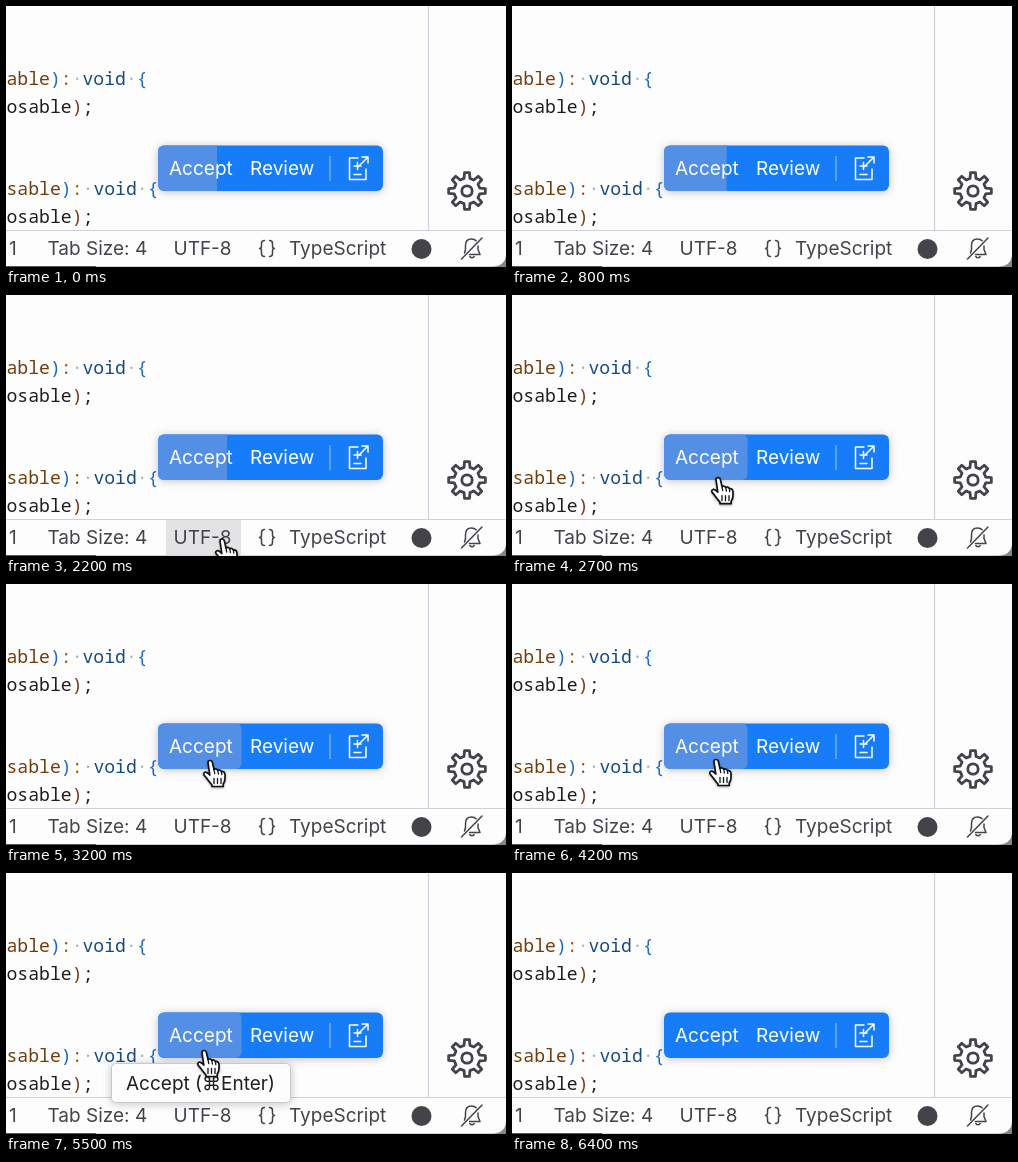
An HTML page that plays this animation: 500 by 261 pixels, repeating every 6500 ms.

```html
<!DOCTYPE html>
<html lang="en">
<head>
<meta charset="utf-8">
<title>Inline edit progress</title>
<style>
  html, body { margin: 0; width: 100%; height: 100%; overflow: hidden; background: #d2d2d6; }
  svg { display: block; width: 100%; height: 100%; }
  text { font: 19px Inter, "Open Sans", sans-serif; fill: #434349; }
  .code text { font: 500 18.1px "Noto Sans Mono", "DejaVu Sans Mono", monospace; fill: #1d1d1f; white-space: pre; }
  .code .param { fill: #713d0b; }
  .code .bracket { fill: #1d68c4; }
  .code .colon { fill: #9a4a10; }
  .code .type { fill: #174a80; }
  .code .dot { fill: #a3aeb4; }
  .code .inner { fill: #7b3814; }
  .icon { fill: none; stroke: #434349; stroke-width: 1.5; stroke-linejoin: round; stroke-linecap: round; }
  .gear { stroke-width: 2.8; }
  .white text { fill: #fff; }
  .white .icon { stroke: #fff; }
  .shadow { filter: drop-shadow(0 1px 4px rgba(40, 40, 60, .28)); }
  .rule { stroke: #d0d0da; stroke-width: 1.2; }
  #tooltip text { fill: #1f1f22; }
</style>
</head>
<body>
<svg viewBox="0 0 500 261" preserveAspectRatio="none">
  <defs>
    <clipPath id="buttonShape"><rect x="152" y="139.5" width="225" height="45.5" rx="6"/></clipPath>
  </defs>

  <path d="M485 261Q500 261 500 246V261Z" fill="#85858d"/>
  <path d="M0 0H500V247Q500 260 487 260H0Z" fill="#fdfdfd"/>
  <path d="M0 260.5H90" stroke="#55555c"/>
  <path class="rule" d="M422.5 0V224M0 224.5H500"/>

  <g class="code">
    <text x="0.5" y="79"><tspan class="param">able</tspan><tspan class="bracket">)</tspan><tspan class="colon">:</tspan><tspan class="dot">·</tspan><tspan class="type">void</tspan><tspan class="dot">·</tspan><tspan class="bracket">{</tspan></text>
    <text x="0.5" y="107">osable<tspan class="inner">)</tspan>;</text>
    <text x="0.5" y="189"><tspan class="param">sable</tspan><tspan class="bracket">)</tspan><tspan class="colon">:</tspan><tspan class="dot">·</tspan><tspan class="type">void</tspan><tspan class="dot">·</tspan><tspan class="bracket">{</tspan></text>
    <text x="0.5" y="217">osable<tspan class="inner">)</tspan>;</text>
  </g>

  <g class="icon gear" transform="translate(461 185)">
    <path id="gear"/>
    <circle r="5.2"/>
  </g>

  <rect id="encodingHover" x="160" y="225" width="75" height="35" fill="#e3e3e5"/>
  <g>
    <text x="3" y="249">1</text>
    <text x="41.5" y="249">Tab Size: 4</text>
    <text x="167.5" y="249">UTF-8</text>
    <text x="283" y="249">TypeScript</text>
  </g>
  <path class="icon" d="M258.5 234.5Q255.5 234.5 255.5 237.5V240Q255.5 242.5 253.5 242.5Q255.5 242.5 255.5 245V247.5Q255.5 250.5 258.5 250.5M263.5 234.5Q266.5 234.5 266.5 237.5V240Q266.5 242.5 268.5 242.5Q266.5 242.5 266.5 245V247.5Q266.5 250.5 263.5 250.5"/>
  <circle cx="415.5" cy="243" r="10" fill="#434349"/>
  <path class="icon" d="M455.5 253L476 232M458.5 247L459.5 243.5V239.5Q459.5 233 465.5 233Q468.5 233 470.2 234.8M472 240V243.5L474 248.5H463.5M463.8 250.5Q466 253 468.2 250.5"/>

  <g class="white">
    <rect class="shadow" x="152" y="139.5" width="225" height="45.5" rx="6" fill="#167cf8"/>
    <g clip-path="url(#buttonShape)">
      <rect id="fill" x="152" y="139" height="46" fill="#548fe6"/>
    </g>
    <text x="163" y="169">Accept</text>
    <text x="244" y="169">Review</text>
    <path d="M324 150V175" stroke="#fff" stroke-opacity=".45" stroke-width="1.3"/>
    <path class="icon" d="M352 152H343.5V173.5H360V163M348 160H355M351.5 156.5V163.5M348 168.5H355M352.5 160.5L362 151M356 151H362V157"/>
  </g>

  <g id="tooltip">
    <rect class="shadow" x="105.5" y="190.5" width="179" height="39" rx="4" fill="#fdfdfd" stroke="#c9c9cc"/>
    <text x="120" y="217">Accept (⌘Enter)</text>
  </g>

  <g id="hand" style="filter:drop-shadow(0 1px 1px rgba(0,0,0,.35))" stroke-linejoin="round" stroke-linecap="round">
    <path d="M-2 2Q-2 0 0 0Q2 0 2.4 2L4 9Q6 7.5 7.8 9.8Q10 8.5 11.4 11Q14.5 10.5 15 14V18Q15 21 13.2 23.5V26H2V24.5Q-1 21-3.5 17.5L-6 14.5Q-6.8 12.5-5 11.8Q-3.2 11.2-.2 14.5Z" fill="#fff" stroke="#111" stroke-width="1.7"/>
    <path d="M4 9L4.7 13M7.8 10L8.4 13.5M11.4 11L11.8 14M4 18V23M7.5 18V23M11 18V23" fill="none" stroke="#111" stroke-width="1.3"/>
  </g>
  <path id="beam" d="M-4-9Q0-9 0-6Q0-9 4-9M0-6V6M-4 9Q0 9 0 6Q0 9 4 9" fill="none" stroke="#222" stroke-width="1.5"/>
</svg>
<script>
const LOOP = 6500, STEP = 100;
const TOOLTIP_START = 4400;
const el = id => document.getElementById(id);
const show = (id, on) => el(id).style.display = on ? '' : 'none';

// Pointer tip: time, x, y
const pointerPath = [
  [2200, 216, 244], [2500, 210, 190], [2800, 204, 179], [3200, 204, 176.5], [3900, 204, 176],
  [4200, 204, 175.5], [4800, 204, 176], [5500, 198, 177.5], [5600, 203, 158], [5900, 236, 5]
];

function pointerAt(t) {
  const next = pointerPath.findIndex(p => p[0] > t);
  if (next < 1) return null;
  const [t0, x0, y0] = pointerPath[next - 1], [t1, x1, y1] = pointerPath[next];
  const k = (t - t0) / (t1 - t0);
  return { x: x0 + (x1 - x0) * k, y: y0 + (y1 - y0) * k };
}

function gearPath(teeth, outer, inner) {
  const points = [];
  for (let i = 0; i < teeth; i++) {
    for (const [offset, r] of [[-.29, inner], [-.17, outer], [.17, outer], [.29, inner]]) {
      const a = (i + offset) / teeth * 2 * Math.PI;
      points.push(`${r * Math.sin(a)} ${-r * Math.cos(a)}`);
    }
  }
  return `M${points.join('L')}Z`;
}

function draw(t) {
  const tip = pointerAt(t);
  const onStatus = !!tip && tip.y >= 225;
  const onAccept = !!tip && tip.x < 235 && tip.y > 139 && tip.y < 185;
  const pointing = onStatus || onAccept;

  show('hand', pointing);
  show('beam', tip && !pointing);
  if (tip) el(pointing ? 'hand' : 'beam').setAttribute('transform', `translate(${tip.x} ${tip.y})`);

  show('encodingHover', onStatus);
  show('tooltip', onAccept && t >= TOOLTIP_START);

  // The first hover ends the countdown.
  const counting = t < TOOLTIP_START && !onAccept;
  el('fill').setAttribute('width', onAccept ? 83.5 : counting ? 59 + t * .0046 : 0);
  el('fill').setAttribute('rx', onAccept ? 6 : 0);
}

el('gear').setAttribute('d', gearPath(8, 18.5, 13));

const start = performance.now();
function tick() {
  const t = (performance.now() - start) % LOOP;
  draw(Math.floor(t / STEP) * STEP);
  requestAnimationFrame(tick);
}
tick();
</script>
</body>
</html>
```
